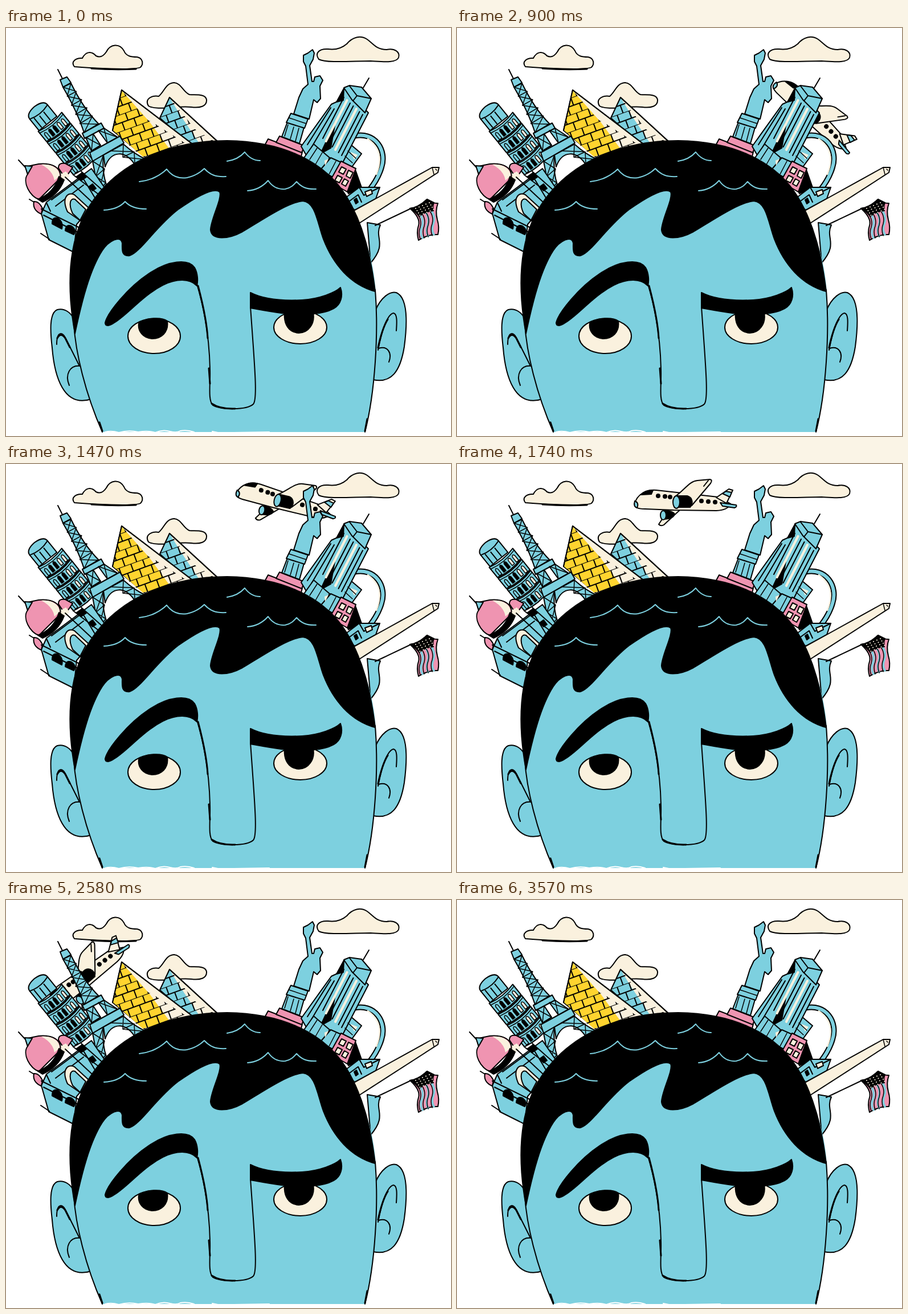
Animation, 781 px wide and 717 px high, one loop 3.6 s. Source, as an HTML page:

```html
<!DOCTYPE html>
<html lang="en">
<head>
<meta charset="utf-8">
<title>City on the mind</title>
<style>
html, body { margin: 0; width: 100%; height: 100%; overflow: hidden; background: #fff; }
svg { display: block; width: 781px; height: 717px; }
.ink { stroke: #000; stroke-width: 2; stroke-linejoin: round; stroke-linecap: round; fill: none; }
.b { fill: #7dd0df; } .c { fill: #faf1de; } .p { fill: #ef94b1; }
.y { fill: #ffd42f; } .k { fill: #000; } .w { fill: #fff; }
.flat { stroke: none; }
.fine { stroke-width: 1.5; }
.bold { stroke-width: 3; }
</style>
</head>
<body>
<svg viewBox="0 0 781 717">
<defs>
  <pattern id="brick" width="22" height="28" patternUnits="userSpaceOnUse" patternTransform="translate(196 124) rotate(-20)">
    <path d="M0 0H22M0 14H22M4 0V14M15 14V28" stroke="#000" stroke-width="2"/>
  </pattern>
</defs>

<g class="ink">
  <g id="clouds" class="c">
    <path d="M120 68C113 59 123 52 134 53C140 41 150 40 158 49C166 53 172 48 176 42C183 28 199 26 207 40C211 50 220 51 230 51C240 53 242 63 236 69C226 75 140 70 120 68Z"/>
    <path d="M250 137C243 125 255 118 268 120C278 112 280 97 295 96C308 97 311 113 322 117C333 118 350 115 352 126C353 138 340 141 325 139C300 136 265 146 250 137Z"/>
    <path d="M549 55C541 44 550 36 565 37C580 39 590 35 598 28C608 16 622 12 634 20C645 28 650 38 668 38C682 35 692 42 689 52C685 62 660 59 640 58C610 58 562 62 549 55Z"/>
    <path class="bold" d="M150 71Q190 74 228 72" fill="none"/>
  </g>

  <g id="plane">
    <path class="c" d="M-28 14L-46 41Q-42 45 -37 42L-8 15Z"/>
    <path class="k" d="M-38 17Q-22 16 -18 23Q-20 31 -36 32Z"/>
    <ellipse class="b" cx="-38" cy="25" rx="5" ry="8"/>
    <path class="c" d="M-88 4C-84 -10 -70 -21 -50 -19L58 -7L80 5Q76 16 55 17L-20 16L-70 14Q-91 14 -88 4Z"/>
    <path class="b" d="M-88 0Q-80 3 -84 12Q-91 10 -88 0Z"/>
    <path class="k" d="M-77 -11Q-70 -19 -56 -19L-59 -12Z"/>
    <path class="c" d="M55 -6L77 -21L84 -19L73 4Z"/>
    <path class="b" d="M66 -13L72 -17L82 -15L79 -7Z"/>
    <path class="b" d="M62 3L90 7Q92 10 87 12L66 9Z"/>
    <path class="c" d="M-17 -8C0 -20 8 -35 22 -36L44 -38Q49 -37 45 -31L12 8L-6 5Z"/>
    <path d="M41 -36L33 -26"/>
    <path class="k" d="M-16 -9H4C14 -6 15 5 9 11H-15Z"/>
    <ellipse class="b" cx="-15" cy="2" rx="6" ry="11"/>
    <g class="k flat" id="panes"></g>
  </g>

  <!-- leaning tower -->
  <g transform="translate(56 146) rotate(-39)">
    <path class="b" d="M-20 2Q-20 -9 0 -10Q20 -9 20 2V28H-20Z"/>
    <path d="M-20 2Q0 9 20 2M-13 6V26M-3 9V26M7 8V26"/>
    <g id="tiers"></g>
  </g>

  <!-- pyramids -->
  <g>
    <path class="c" d="M287 122L373 201L330 212L272 160Z"/>
    <path class="b flat" d="M287 122L270 158L324 205L338 201L304 150Z"/>
    <path class="flat" fill="url(#brick)" d="M287 122L270 158L324 208L370 202L332 178Z"/>
    <path d="M287 122L270 158L330 212M287 122L373 201"/>
    <path class="c" d="M203 109L330 206L250 232L187 180Z"/>
    <path class="y flat" d="M203 110L188 180L240 226L288 214L252 165Z"/>
    <path class="flat" fill="url(#brick)" d="M203 109L187 180L240 228L320 206L264 170L246 160Z"/>
    <path d="M203 109L187 180M203 109L330 206"/>
  </g>

  <!-- iron tower -->
  <g>
    <path d="M91 73L99 89"/>
    <path class="b" d="M95 91L107 86L114 96L100 104Z"/>
    <path class="b" d="M100 104L114 97C130 130 147 153 163 169L137 184C128 156 114 128 100 104Z"/>
    <path class="b" d="M140 192L153 186L166 206L150 216Z"/>
    <path class="b" d="M162 180L172 176L196 192L178 202Z"/>
    <path class="b" d="M152 234L171 223C169 245 172 263 176 275L163 292Z"/>
    <path class="b" d="M171 223L206 204Q226 222 246 231L226 240C211 216 185 213 174 244Z"/>
    <path class="b" d="M134 185L167 167L172 176L138 194Z"/>
    <path class="b" d="M147 219L200 190L207 202L152 234Z"/>
    <path class="fine" id="lattice"/>
  </g>

  <!-- onion domes -->
  <g>
    <path class="p" d="M92 246Q92 236 104 238L117 245L104 264Z"/>
    <path class="b" d="M71 306L150 247L176 285L124 345L119 394L75 372L62 326Z"/>
    <path class="c flat" d="M88 262L105 252L112 260L95 275Z"/>
    <path d="M22 232L35 246"/>
    <path class="p" d="M34 243C47 243 56 236 72 239C87 241 98 249 95 264L58 301C42 297 28 270 38 257Z"/>
    <path class="c flat" d="M62 240C77 238 94 245 94 260L85 268Q82 250 62 240Z"/>
    <path class="b" d="M33 242L46 243L38 257Z"/>
    <path class="k" d="M56 301Q84 290 93 261L102 267Q92 294 64 306Z"/>
    <path class="p" d="M49 305Q58 304 64 317L62 327Q46 320 49 305Z"/>
    <path d="M41 301L49 306M61 361L76 371M62 318L131 352M66 329L124 358M71 307L78 322M80 302L134 262L157 300M87 313L136 276M104 262L150 305M118 258L162 292M132 252L168 284"/>
    <path class="k" d="M124 261L134 254L141 262L132 268ZM145 279L152 274L158 282L152 286Z"/>
    <path class="c" d="M108 323C97 299 108 287 120 293L145 316L131 339Z"/>
    <path class="b" d="M117 326C109 309 113 298 121 301L140 319L130 338Z"/>
    <path class="k" d="M81 344Q81 331 91 334Q101 341 98 353ZM104 356Q105 344 115 348Q124 354 119 363Z"/>
  </g>

  <!-- statue on its plinth -->
  <g>
    <path class="p" d="M453 208L460 195L520 218L516 234Z"/>
    <path class="p" d="M474 201L480 190L524 207L519 219Z"/>
    <path class="b" d="M484 191L494 165L523 175L515 203Z"/>
    <path class="b" d="M492 166L500 150L530 160L524 176Z"/>
    <path class="fine" d="M495 170L489 190M505 174L499 195M514 176L508 199M497 158L527 168"/>
    <path class="b" d="M505 151L514 122L521 107L530 99L526 67L522 59V48L530 44L538 38L541 44L539 55L533 66L537 94H540L542 86L551 84L556 92L551 102L552 124L546 131L540 126L532 160Z"/>
  </g>

  <!-- arch -->
  <path d="M610 190C648 181 669 215 659 245C654 262 646 274 638 284" stroke-width="10"/>
  <path d="M610 190C648 181 669 215 659 245C654 262 646 274 638 284" stroke="#7dd0df" stroke-width="6"/>
  <path d="M635 195C658 211 660 232 650 257" stroke="#faf1de" stroke-width="2.5"/>

  <!-- skyscraper -->
  <g>
    <path d="M637 88L627 105"/>
    <path class="b" d="M604 204L624 221L594 262L574 247Z"/>
    <path class="b" d="M518 208L571 134L584 128L594 106L636 149L586 246L540 246Z"/>
    <path class="b" d="M593 105L603 101L624 104L641 124L630 149L607 126Z"/>
    <path d="M603 102L616 119L641 124M616 119L609 128"/>
    <path class="k" d="M580 130L593 106L592 127ZM552 221L578 165L570 211Z"/>
    <g id="ribs"></g>
    <path class="b" d="M540 204L568 228L552 252L523 228Z"/>
    <path class="b" d="M570 228L588 236L577 264L551 250Z"/>
    <path class="c flat" d="M559 233L566 230L560 242ZM605 218L617 223L611 231Z"/>
    <path class="fine" d="M546 211L533 231M555 219L543 240M579 234L567 257M600 216L614 229M595 225L608 237"/>
  </g>

  <!-- pink block, house -->
  <path class="k" d="M612 246L624 280L601 291L588 265Z"/>
  <path class="p" d="M588 234L614 247L599 288L568 270Z"/>
  <path class="c" d="M589 244L597 248L592 257L584 253ZM601 250L609 254L604 264L597 260ZM582 259L590 263L585 272L577 268ZM594 265L601 269L596 278L589 274Z"/>
  <path class="b" d="M591 302L620 280H656L649 300L612 320Z"/>
  <path d="M620 280L628 294L656 280M603 304L618 293L624 306"/>
  <path class="c" d="M630 288L641 284L643 291L633 296Z"/>
  <path class="k" d="M611 302L615 299L618 306L614 309Z"/>

  <!-- far ear, obelisk, flag -->
  <path class="b" d="M634 342L657 346C646 370 670 378 640 413Z"/>
  <path d="M648 347L711 317"/>
  <path class="c" d="M748 245L760 245L758 254L620 343L609 322Z"/>
  <path class="fine" d="M748 245L751 257M754 248L756 250"/>
  <path class="p" d="M709 317Q723 316 739 301Q750 309 758 308Q753 322 757 337Q761 350 758 363Q741 362 724 373Q720 359 724 347Q728 334 709 317Z"/>
  <g stroke-width="3.5">
    <path id="bar" d="M722 321Q735 335 730 350Q726 360 731 369" stroke="#7dd0df"/>
    <use href="#bar" x="10" y="-3"/><use href="#bar" x="20" y="-6"/>
  </g>
  <g class="fine">
    <path id="seam" d="M718 322Q731 335 727 350Q723 360 727 371"/>
    <use href="#seam" x="7" y="-2"/><use href="#seam" x="14" y="-4"/><use href="#seam" x="21" y="-6"/>
  </g>
  <path class="k" d="M709 317Q723 316 739 301L751 307Q748 314 750 321Q736 322 725 331Q719 322 709 317Z"/>
  <g class="c flat" id="stars"></g>

  <!-- head -->
  <path class="b" d="M121 516C115 499 102 492 90 495C75 501 78 536 81 562C85 612 101 668 150 652Z"/>
  <path class="b" d="M648 497C658 473 674 462 685 465C706 474 704 522 699 560C692 604 676 625 644 618Z"/>
  <path class="b flat" d="M121 525C120 380 200 215 385 205C560 205 640 330 649 463C654 535 648 640 630 710H168C146 650 127 602 121 525Z"/>
  <path d="M119 520C122 570 139 642 169 710M648 460C654 535 648 640 630 710"/>
  <path d="M89 556C89 533 99 532 106 548L128 592M130 594C112 592 103 609 111 628"/>
  <path d="M653 566C660 528 670 503 680 501C687 502 686 518 685 532M654 563C670 558 678 571 672 587"/>
  <path class="bold" d="M90 545Q96 534 104 545L112 561M653 562Q660 528 670 512"/>
  <path class="k" d="M121 537C106 455 109 377 142 320C190 238 285 198 388 198C488 199 560 236 597 295C627 344 640 400 648 463C604 451 574 415 557 371C546 340 543 306 521 304C494 306 441 343 415 358C391 371 361 374 359 355C359 337 380 299 375 288C364 279 332 298 302 319C264 348 235 395 217 400C202 402 204 389 204 378C201 363 180 374 169 391C147 425 133 480 121 537Z"/>
  <g stroke="#7dd0df">
    <path d="M234 270C255 268 272 258 282 248C292 262 305 265 318 263C331 260 340 255 348 247C358 258 368 262 386 261"/>
    <path d="M388 234C402 232 412 226 419 218C427 229 436 233 446 233"/>
    <path d="M424 286C440 285 452 277 460 268C468 280 478 284 490 283C500 281 505 276 510 270C518 279 527 284 544 283"/>
    <path d="M172 320C190 319 202 313 209 305C217 314 230 318 246 318"/>
  </g>

  <!-- face -->
  <ellipse class="c" cx="260" cy="541.5" rx="46" ry="30.5"/>
  <path class="k" d="M233 519C245 508 274 508 283 515C286 535 272 546 257 546C240 545 231 532 233 519Z"/>
  <ellipse class="c" cx="516.5" cy="526" rx="46.5" ry="29"/>
  <path class="k" d="M489 500H539C543 520 530 536 514 536C496 535 487 520 489 500Z"/>
  <path class="k" d="M174 518C178 500 215 455 250 432C285 408 320 405 331 421C337 432 337 445 335 453C322 440 300 440 275 452C240 470 212 505 190 518C180 525 174 524 174 518Z"/>
  <path class="k" d="M429 465C450 476 480 480 520 478C550 476 578 465 587 456C592 470 588 486 575 493C555 504 520 505 490 502C460 498 440 494 429 492Z"/>
  <path d="M335 450C350 500 357 550 358 600C359 625 354 654 363 663C376 671 422 672 434 661C442 652 436 590 429 490"/>
  <path class="bold" d="M337 453Q352 510 354 545M356 598L358 625M361 660Q376 670 402 669M169 708L164 693M630 708L634 687"/>
  <path class="w flat" d="M0 711H781V717H0Z"/>
  <path stroke="#fff" d="M174 710Q185 707 198 711Q215 706 232 710Q250 707 262 711Q275 705 288 709Q300 712 306 708Q318 706 330 710M362 709L372 711M400 711L462 710"/>
</g>
</svg>

<script>
const $ = id => document.getElementById(id);
const lerp = (a, b, k) => a + (b - a) * k;
const range = n => [...Array(n).keys()];

$('panes').innerHTML = [[-47, -9], [-35, -8], [-26, -7], [29, 0], [41, 1], [53, 2]]
  .map(([x, y]) => `<circle cx="${x}" cy="${y}" r="4"/>`).join('');

$('tiers').innerHTML = range(4).map(i => {
  const y = 28 + i * 25;
  const arches = range(5).map(j => {
    const x = -17 + j * 9.5, tone = 'bkkcc'[j];
    return `<path class="${tone} fine" d="M${x} ${y + 23}V${y + 12}q2.5 -6 5 0V${y + 23}Z"/>`;
  }).join('');
  return `<path class="b" d="M-22 ${y}Q5 ${y + 7} 31 ${y}V${y + 23}Q5 ${y + 30} -22 ${y + 23}Z"/>` +
    `<path class="fine" d="M-22 ${y + 4}Q5 ${y + 11} 31 ${y + 4}"/>` + arches;
}).join('');

// Cross braces between two edges, each given as x1, y1, x2, y2.
function braces(a, b, n) {
  const at = (e, k) => `${lerp(e[0], e[2], k)} ${lerp(e[1], e[3], k)}`;
  return range(n).map(i => {
    const u = i / n, v = (i + 1) / n;
    return `M${at(a, u)}L${at(b, v)}L${at(a, v)}L${at(b, u)}`;
  }).join('');
}
$('lattice').setAttribute('d',
  braces([100, 104, 137, 184], [114, 97, 161, 169], 5) +
  braces([140, 192, 150, 216], [153, 186, 166, 206], 1) +
  braces([162, 180, 178, 202], [172, 176, 196, 192], 1) +
  braces([152, 234, 163, 288], [171, 223, 175, 272], 2) +
  braces([184, 216, 226, 238], [206, 204, 244, 231], 2));

$('ribs').innerHTML = range(7).map(i => {
  const x = 593 + i * 5.5, y = 122 + i * 5, light = i % 3 == 1;
  return `<path d="M${x} ${y}l-37 72" stroke="${light ? '#faf1de' : '#000'}" stroke-width="${light ? 4 : 2}"/>`;
}).join('') + '<path d="M570 140L529 205M576 142L536 210"/>';

$('stars').innerHTML = range(20).map(i => {
  const c = i % 5, r = i / 5 | 0;
  return `<circle cx="${719 + c * 6 + r * 2.5}" cy="${317 - c * 2.5 + r * 4}" r="1.1"/>`;
}).join('');

// Flight: time, x, y, heading.
const route = [
  [240, 552, 395, 88], [390, 602, 322, 74], [630, 651, 235, 57], [1200, 571, 84, 26],
  [1740, 400, 65, 0], [2070, 294, 69, -16], [2580, 142, 132, -41],
  [2850, 125, 215, -58], [3150, 215, 370, -85]
];
const slope = (i, j) => {
  const a = route[Math.max(i - 1, 0)], b = route[Math.min(i + 1, route.length - 1)];
  return (b[j] - a[j]) / (b[0] - a[0]);
};
function pose(t) {
  const i = route.findIndex((p, n) => n < route.length - 1 && t < route[n + 1][0]);
  const a = route[i], b = route[i + 1], d = b[0] - a[0], k = (t - a[0]) / d;
  return [1, 2, 3].map(j => {
    const s = k * k * (3 - 2 * k);
    return lerp(a[j], b[j], s) + d * k * (1 - k) * ((1 - k) * slope(i, j) - k * slope(i + 1, j));
  });
}

const plane = $('plane'), loop = 3600, step = 30;
function draw() {
  const t = Math.floor(performance.now() % loop / step) * step;
  const shown = t >= route[0][0] && t < route[route.length - 1][0];
  plane.style.display = shown ? '' : 'none';
  if (shown) {
    const [x, y, r] = pose(t);
    plane.setAttribute('transform', `translate(${x} ${y}) rotate(${r})`);
  }
  requestAnimationFrame(draw);
}
draw();
</script>
</body>
</html>
```
